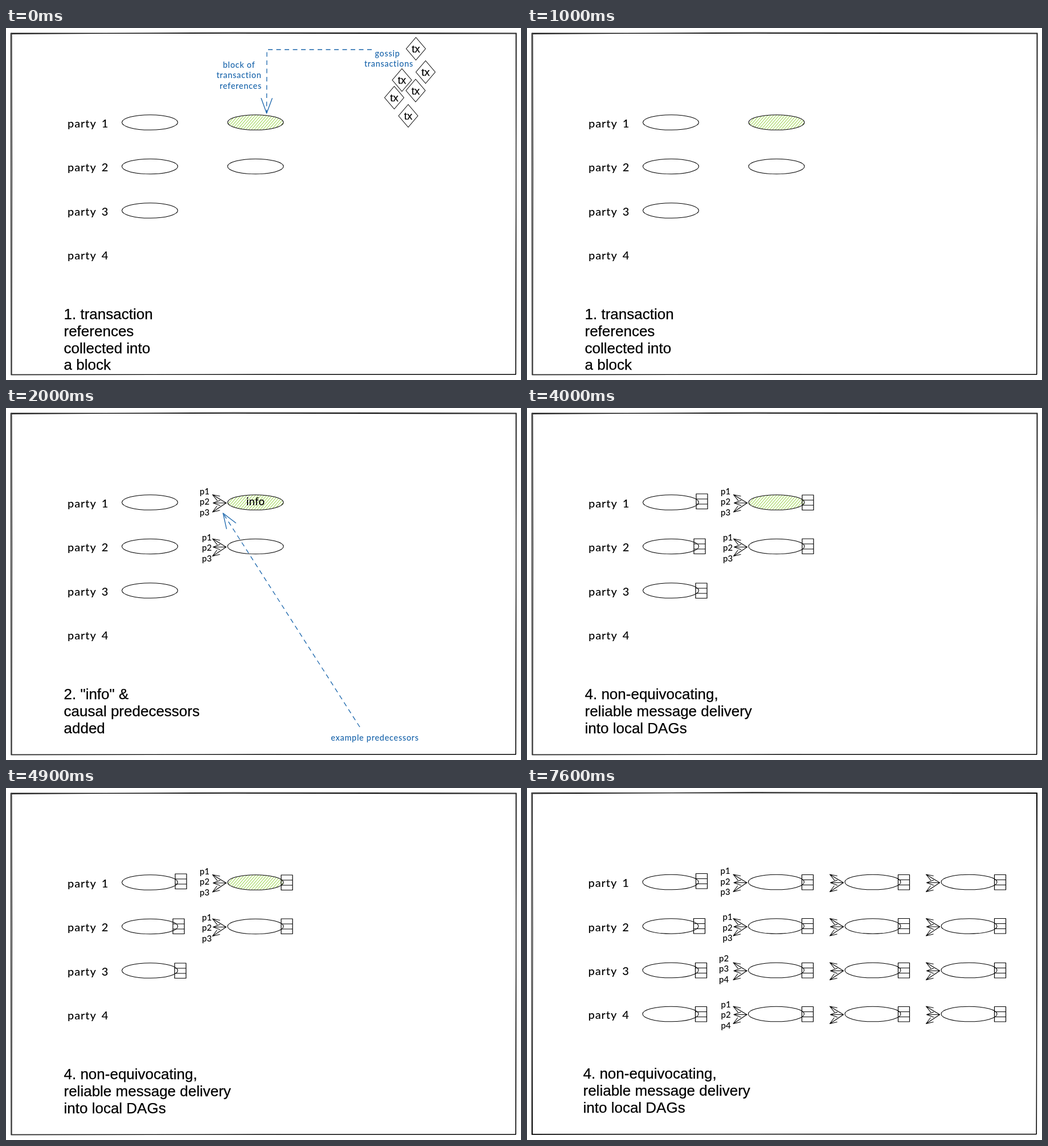
Write an HTML page that moves like this. It is 904 px wide and 619 px high and loops after 9000 ms.

```html
<!DOCTYPE html>
<html lang="en">
<head>
<meta charset="utf-8">
<title>Block dissemination in four steps</title>
<style>
  html, body { margin: 0; width: 100%; height: 100%; overflow: hidden; background: #fff; }
  svg { display: block; width: 904px; height: 619px; }
  .line { fill: none; stroke: #000; stroke-width: 1.05; stroke-linecap: round; stroke-linejoin: round; }
  .box { stroke-width: 1.2; }
  .blue { stroke: #1864ab; stroke-width: 1.3; }
  .dash { stroke-dasharray: 8 6.5; stroke-linecap: butt; }
  .hatch { stroke: #82c91e; stroke-width: 1; }
  .hand { font-family: Lato, sans-serif; font-weight: 500; letter-spacing: .9px; }
  .note { font-size: 14.5px; fill: #1864ab; text-anchor: middle; letter-spacing: .7px; }
  .party { font-size: 20px; word-spacing: 3.5px; }
  .ref { font-size: 15px; letter-spacing: 0; }
  .info { font-size: 18.5px; text-anchor: middle; letter-spacing: .3px; }
  .caption { font: 26px "Liberation Sans", Arial, sans-serif; stroke: #000; stroke-width: .25; }
  .tx { font: 18.5px "Liberation Sans", Arial, sans-serif; text-anchor: middle; stroke: #000; stroke-width: .25; }
</style>
</head>
<body>
<svg id="stage" viewBox="0 0 904 619">
  <defs><clipPath id="oval"><ellipse cx="438" cy="166" rx="48.5" ry="13"/></clipPath></defs>
</svg>
<script>
const ROWS = [166, 243.5, 321, 398];
const COLUMNS = [252.5, 438, 607.5, 776.5];

const path = (d, cls = '', extra = '') => `<path class="line ${cls}" d="${d}" ${extra}/>`;
const text = (x, y, cls, value) => `<text x="${x}" y="${y}" class="${cls}">${value}</text>`;
const note = (x, y, value) => text(x, y, 'hand note', value);
const ellipse = (x, y) => `<ellipse class="line" cx="${x}" cy="${y}" rx="49" ry="13.3"/>`;

const caption = lines => lines
  .map((line, i) => text(101.5, 512 + i * 29.8, 'caption', line.replace('&', '&amp;'))).join('');

const frame = () => path('M8.5 9L450 9.5L895 10L895.5 330L895 609L450 609L9 610L8.5 300Z') +
  path('M10 10.5L400 8L896 9L894.5 609.5L520 609.5L10 609L10.5 250Z');

const parties = () => ROWS.map((y, i) => text(108, y + 8.5, 'hand party', `party ${i + 1}`)).join('');

// Two barbs, 20 degrees either side of the shaft.
function head(fromX, fromY, x, y, size) {
  const angle = Math.atan2(fromY - y, fromX - x);
  const barb = turn => `${x + size * Math.cos(angle + turn)} ${y + size * Math.sin(angle + turn)}`;
  return `M${barb(.35)}L${x} ${y}L${barb(-.35)}`;
}

function pointer(points) {
  const [from, tip] = points.slice(-2);
  const size = Math.min(28, Math.hypot(from[0] - tip[0], from[1] - tip[1]) / 2);
  return path('M' + points.join('L'), 'blue dash') + path(head(...from, ...tip, size), 'blue');
}

function fan(column, row) {
  const x = COLUMNS[column] - 51.5, y = ROWS[row] + 1;
  return [[-24, -14.5], [-23, 0], [-24, 16]].map(([dx, dy]) =>
    path(`M${x} ${y}l${dx} ${dy}` + head(x, y, x + dx, y + dy, 13))).join('');
}

const refs = (x, y, names) => names
  .map((name, i) => text(x, y + i * 18.5, 'hand ref', name)).join('');

const acks = (x, y) => path(`M${x} ${y}h20v26.5h-20zM${x} ${y + 9}h20M${x} ${y + 18}h20`, 'box');

function hatching() {
  let d = '';
  for (let x = 364; x < 490; x += 5) d += `M${x} 181l26 -30`;
  return path(d, 'hatch', 'clip-path="url(#oval)"');
}

const firstColumn = count => ROWS.slice(0, count).map(y => ellipse(COLUMNS[0], y)).join('');
const base = () => frame() + parties() + firstColumn(3) + hatching() +
  ellipse(COLUMNS[1], ROWS[0]) + ellipse(COLUMNS[1], ROWS[1]);

const firstRefs = () => refs(340, 151.5, ['p1', 'p2', 'p3']) + refs(344, 232.5, ['p1', 'p2', 'p3']);
const predecessors = () => fan(1, 0) + fan(1, 1) + firstRefs();

const info = () => text(438, 171, 'hand info', 'info');
const firstAcks = () => acks(297, 151) + acks(293, 230) + acks(296, 308);
const echoes = () => firstAcks() + acks(483, 153) + acks(483, 230);

const gossip = () => [[719.5, 36.5], [736.5, 77.5], [695, 91.5], [719, 110], [681.5, 122.5], [706, 154.5]]
  .map(([x, y]) => path(`M${x} ${y - 20}l17 20l-17 20l-17 -20z`) + text(x, y + 6.5, 'tx', 'tx')).join('') +
  note(669.5, 50, 'gossip') + note(672, 67.5, 'transactions') +
  note(409, 69.5, 'block of') + note(409, 88, 'transaction') + note(412, 107, 'references') +
  pointer([[642, 38], [458, 38], [457.5, 150]]);

function fullGraph() {
  let out = frame() + parties() + firstColumn(4) + firstAcks() + acks(296, 385) + firstRefs() +
    refs(337.5, 305, ['p2', 'p3', 'p4']) + refs(341, 386, ['p1', 'p2', 'p4']);
  ROWS.forEach((y, row) => [1, 2, 3].forEach(column => {
    const x = COLUMNS[column];
    out += fan(column, row) + ellipse(x, y) + acks(Math.floor(x + 45), Math.floor(y - 13));
  }));
  return `<g transform="translate(-.5 -.5)">${out}</g>`;
}

const collected = caption(['1. transaction', 'references', 'collected into', 'a block']);
const delivered = caption(['4. non-equivocating,', 'reliable message delivery', 'into local DAGs']);

const scenes = [
  { start: 0, art: base() + collected + gossip() },
  { start: 1000, art: base() + collected },
  { start: 2000, art: base() + predecessors() + info() +
      caption(['2. "info" &', 'causal predecessors', 'added']) +
      pointer([[621, 561], [381, 185]]) + note(647.5, 584.5, 'example predecessors') },
  { start: 3000, art: base() + predecessors() + info() + echoes() +
      caption(['3. 2F+1 echoes', 'collected']) +
      pointer([[490, 93], [493.5, 146]]) + note(501, 80.5, "2F+1 echoes/ACK's") },
  { start: 4000, art: base() + predecessors() + echoes() + delivered },
  { start: 5500, art: fullGraph() + `<g transform="translate(-3 -1)">${delivered}</g>` }
];

const stage = document.getElementById('stage');
stage.insertAdjacentHTML('beforeend', scenes.map(s => `<g class="scene">${s.art}</g>`).join(''));
const groups = stage.querySelectorAll('.scene');
const begin = performance.now();

function show(now) {
  const time = Math.max(0, now - begin) % 9000;
  const current = scenes.findLastIndex(s => time >= s.start);
  groups.forEach((g, i) => g.style.display = i === current ? '' : 'none');
  requestAnimationFrame(show);
}
show(begin);
</script>
</body>
</html>
```
